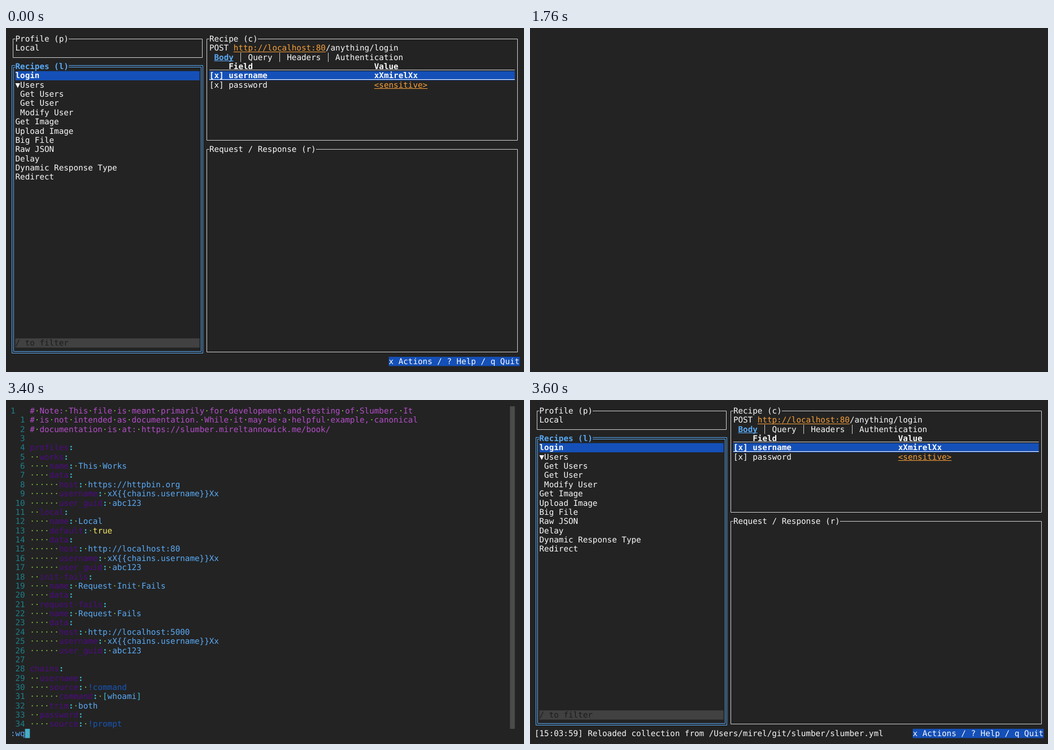
These frames come from a looping animation (917x611 px, 4.32 s). An HTML page:

```html
<!DOCTYPE html>
<html lang="en">
<head>
<meta charset="utf-8">
<title>Terminal session</title>
<style>
  html, body { margin: 0; width: 100%; height: 100%; overflow: hidden; background: #232323; }
  svg { display: block; width: 917px; height: 611px; }
  text {
    font: 14.26px "DejaVu Sans Mono", monospace;
    white-space: pre;
    text-rendering: geometricPrecision;
  }
  .b { font-weight: bold; }
  path { fill: none; stroke-width: 1; }
  svg > g { visibility: hidden; animation: 4320ms step-end infinite; }

  #tui     { animation-name: tui; }
  #popup   { animation-name: popup; }
  #shell   { animation-name: shell; }
  #file    { animation-name: file; }
  #status  { animation-name: status; }
  #cursor  { animation-name: cursor; }
  #colon   { animation-name: colon; }
  #quit    { animation-name: quit; }
  #caret   { animation-name: caret; }
  #message { animation-name: message; }

  @keyframes tui     { 0%, 81.4814% { visibility: visible } 39.8148%, 100% { visibility: hidden } }
  @keyframes popup   { 0%, 39.8148%, 100% { visibility: hidden } 19.4444% { visibility: visible } }
  @keyframes shell   { 0%, 40.7407%, 81.4814%, 100% { visibility: hidden } 39.8148%, 80.5555% { visibility: visible } }
  @keyframes file    { 0%, 79.6296%, 100% { visibility: hidden } 42.5925% { visibility: visible } }
  @keyframes status  { 0%, 76.8518%, 100% { visibility: hidden } 41.6666% { visibility: visible } }
  @keyframes cursor  { 0%, 76.8518%, 100% { visibility: hidden } 42.5925% { visibility: visible } }
  @keyframes colon   { 0%, 78.7037%, 100% { visibility: hidden } 76.8518% { visibility: visible } }
  @keyframes quit    { 0%, 79.6296%, 100% { visibility: hidden } 78.7037% { visibility: visible } }
  @keyframes caret   { 0%, 80.5555%, 100% { visibility: hidden } 79.6296% { visibility: visible } }
  @keyframes message { 0%, 100% { visibility: hidden } 83.3333% { visibility: visible } }
</style>
</head>
<body>
<svg viewBox="0 0 917 611">
  <g id="tui"></g><g id="message"></g><g id="popup"></g>
  <g id="shell"></g>
  <g id="file"></g><g id="status"></g><g id="cursor"></g>
  <g id="colon"></g><g id="quit"></g><g id="caret"></g>
</svg>
<script>
const CW = 8.585, CH = 16.37;
const C = {
  bg: '#232323', white: '#fafafa', line: '#cfcfcf', select: '#1450b8', sky: '#5aabf7',
  orange: '#f7a03a', green: '#80ba40', prompt: '#5050e0', purple: '#b44ec8', teal: '#1f7f88',
  key: '#4f0a85', cyan: '#3fbccf', yellow: '#f7e768', tag: '#1657b8', cursor: '#45aec8',
  bar: '#414141', dim: '#1c1c1c', scroll: '#4b4b4b'
};

const px = col => 7.9 + col * CW;
const py = row => 11.1 + row * CH;
const snap = v => Math.floor(v) + 0.5;
let layer;
const into = id => { layer = document.getElementById(id); };

function add(tag, attrs, str) {
  const el = document.createElementNS('http://www.w3.org/2000/svg', tag);
  for (const k in attrs) el.setAttribute(k, attrs[k]);
  if (str) el.textContent = str;
  layer.append(el);
}

function put(row, col, str, fill = C.white, bold = false) {
  add('text', { x: px(col), y: py(row) + 12.8, fill, class: bold ? 'b' : '' }, str);
}

function block(row, col, cols, fill, rows = 1) {
  add('rect', { x: px(col), y: py(row), width: cols * CW, height: rows * CH, fill });
}

function underline(row, col, cols, stroke) {
  add('path', { d: `M${px(col)} ${snap(py(row) + 14.7)}h${cols * CW}`, stroke });
}

function link(row, col, str, fill, bold) {
  put(row, col, str, fill, bold);
  underline(row, col, str.length, fill);
}

// Border through cell centres, with a gap in the top edge for the title.
function frame(c0, r0, c1, r1, title, stroke, double) {
  for (const d of double ? [-1.5, 1.5] : [0]) {
    const l = snap(px(c0 + 0.5) + d), r = snap(px(c1 + 0.5) - d);
    const t = snap(py(r0 + 0.5) + d), b = snap(py(r1 + 0.5) - d);
    add('path', { d: `M${px(c0 + 1 + title.length)} ${t}H${r}V${b}H${l}V${t}H${px(c0 + 1)}`, stroke });
  }
}

// Main interface
into('tui');
frame(0, 0, 39, 2, 'Profile (p)', C.line);
put(0, 1, 'Profile (p)');
put(1, 1, 'Local');

frame(0, 3, 39, 34, 'Recipes (l)', C.sky, true);
put(3, 1, 'Recipes (l)', C.sky, true);
block(4, 1, 38, C.select);
put(4, 1, 'login', C.white, true);
['▼Users', ' Get Users', ' Get User', ' Modify User', 'Get Image', 'Upload Image', 'Big File',
  'Raw JSON', 'Delay', 'Dynamic Response Type', 'Redirect'].forEach((s, i) => put(5 + i, 1, s));
block(33, 1, 38, C.bar);
put(33, 1, '/ to filter', C.dim);

frame(40, 0, 104, 11, 'Recipe (c)', C.line);
put(0, 41, 'Recipe (c)');
put(1, 41, 'POST');
link(1, 46, 'http://localhost:80', C.orange);
put(1, 65, '/anything/login');
link(2, 42, 'Body', C.sky, true);
put(2, 49, 'Query');
put(2, 57, 'Headers');
put(2, 67, 'Authentication');
for (const col of [47, 55, 65]) {
  add('path', { d: `M${snap(px(col + 0.5))} ${py(2)}v${CH}`, stroke: C.line });
}
put(3, 45, 'Field', C.white, true);
put(3, 75, 'Value', C.white, true);
underline(3, 41, 63, C.line);
block(4, 41, 63, C.select);
put(4, 41, '[x] username', C.white, true);
put(4, 75, 'xXmirelXx', C.white, true);
underline(4, 41, 63, C.white);
put(5, 41, '[x] password');
link(5, 75, '<sensitive>', C.orange);

frame(40, 12, 104, 34, 'Request / Response (r)', C.line);
put(12, 41, 'Request / Response (r)');
block(35, 78, 27, C.select);
put(35, 78, 'x Actions / ? Help / q Quit');

into('message');
put(35, 0, '[15:03:59] Reloaded collection from /Users/mirel/git/slumber/slumber.yml');

into('popup');
block(15, 35, 34, C.bg, 6);
frame(35, 15, 68, 20, 'Actions', C.line, true);
put(15, 36, 'Actions');
block(16, 37, 30, C.select);
put(16, 37, 'Edit Collection', C.white, true);
['Copy URL', 'Copy as cURL', 'Delete Requests'].forEach((s, i) => put(17 + i, 37, s));

// Shell
into('shell');
put(0, 0, '>', C.prompt, true);
put(0, 2, 'cargo run');
put(1, 4, 'Finished', C.green, true);
put(1, 13, '`dev` profile [unoptimized + debuginfo] target(s) in 0.39s');
put(2, 5, 'Running', C.green, true);
put(2, 13, '`target/debug/slumber`');

// Editor
const source = `# Note: This file is meant primarily for development and testing of Slumber. It
# is not intended as documentation. While it may be a helpful example, canonical
# documentation is at: https://slumber.mireltannowick.me/book/

profiles:
  works:
    name: This Works
    data:
      host: https://httpbin.org
      username: xX{{chains.username}}Xx
      user_guid: abc123
  local:
    name: Local
    default: true
    data:
      host: http://localhost:80
      username: xX{{chains.username}}Xx
      user_guid: abc123
  init-fails:
    name: Request Init Fails
    data:
  request-fails:
    name: Request Fails
    data:
      host: http://localhost:5000
      username: xX{{chains.username}}Xx
      user_guid: abc123

chains:
  username:
    source: !command
      command: [whoami]
    trim: both
  password:
    source: !prompt`;

function valueColor(v) {
  return v[0] === '!' ? C.tag : v === 'true' ? C.yellow : C.sky;
}

function tokens(str) {
  if (str[0] === '#') return [[str, C.purple]];
  const m = str.match(/^( *)([\w-]+)(:)( ?)(.*)$/);
  if (!m) return [];
  const [, indent, key, colon, gap, value] = m;
  const parts = value.split(/([[\]])/).map(v => [v, /^[[\]]$/.test(v) ? C.cyan : valueColor(v)]);
  return [[indent, C.green], [key, C.key], [colon, C.cyan, true], [gap, C.green], ...parts];
}

into('file');
source.split('\n').forEach((str, row) => {
  put(row, 0, row ? String(row).padStart(3) : '1', C.teal);
  let col = 4;
  for (const [run, fill, bold] of tokens(str)) {
    for (const word of run.match(/ +|[^ ]+/g) || []) {
      if (word[0] === ' ') put(row, col, '·'.repeat(word.length), C.green);
      else put(row, col, word, fill, bold);
      col += word.length;
    }
  }
});
block(0, 103, 1, C.scroll, 35);

into('status');
put(35, 0, '"~/git/slumber/slumber.yml" 177L, 3921B', C.sky);

into('cursor');
block(0, 4, 1, C.cursor);
put(0, 4, '#', C.bg);

for (const [id, cmd] of [['colon', ':'], ['quit', ':wq']]) {
  into(id);
  put(35, 0, cmd, C.sky);
  block(35, cmd.length, 1, C.cursor);
}

into('caret');
block(35, 3, 1, C.cursor);
</script>
</body>
</html>
```
